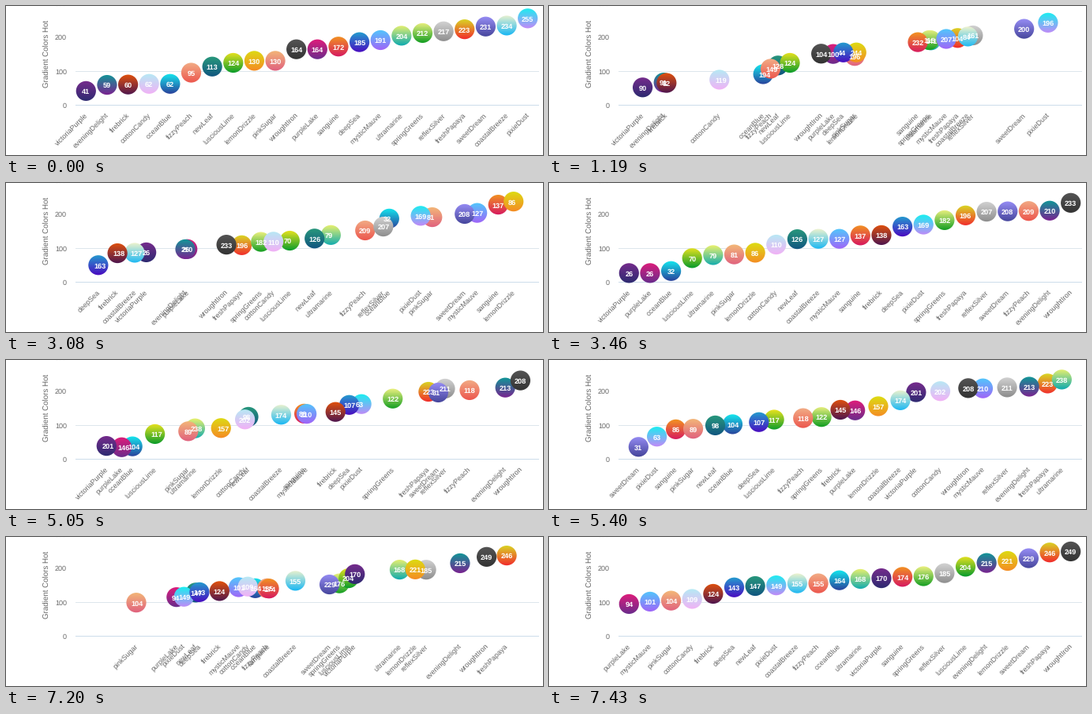
Animation of 680 by 190 pixels, one loop 8000 ms. Source, as a matplotlib script:

```python
import math

import matplotlib.pyplot as plt
import numpy as np
from matplotlib.animation import FuncAnimation
from matplotlib.patches import Circle

WIDTH, HEIGHT, DPI = 680, 190, 100
LOOP, STEP = 8000, 20
LEFT, RIGHT, BASE, UNIT = 88, 674, 126.1, 0.4325
RADIUS, DIGIT = 12.6, 5
GREY = "#666666"

# name, gradient colours from top to bottom, value in each round; topmost first
SERIES = [
    ("wroughtIron", "#565656 #333333", "164 104 233 208 249"),
    ("firebrick", "#e8540a #4a1450", "60 82 138 145 124"),
    ("cottonCandy", "#b4ecf4 #f2b0f6", "62 119 110 202 109"),
    ("eveningDelight", "#0c9c98 #7c2090", "59 91 210 213 215"),
    ("coastalBreeze", "#f8f6cc #16b6f4", "234 84 127 174 155"),
    ("deepSea", "#22a4d0 #4a08c0", "185 44 163 107 143"),
    ("sweetDream", "#9a90f8 #44449a", "231 200 208 31 229"),
    ("pixieDust", "#10f4f0 #c488f8", "255 196 169 63 149"),
    ("mysticMauve", "#4ecbfc #a262f8", "191 207 127 210 101"),
    ("lemonDrizzle", "#dce012 #f58a24", "130 244 86 157 221"),
    ("pinkSugar", "#f4bc78 #e0607e", "130 196 81 89 104"),
    ("sanguine", "#f49a1e #d61860", "172 232 137 86 174"),
    ("reflexSilver", "#d6d6d6 #8c8c8c", "217 161 207 211 185"),
    ("victoriaPurple", "#7a2c8e #2c2a70", "41 90 26 201 170"),
    ("purpleLake", "#e41c7a #662c8c", "164 100 26 146 94"),
    ("fizzyPeach", "#f2b088 #ec544c", "95 149 209 118 155"),
    ("lusciousLime", "#f4e61e #049a2c", "124 124 70 117 204"),
    ("newLeaf", "#2a9c7c #105480", "113 128 126 98 147"),
    ("springGreens", "#f6f484 #0c9c1e", "212 115 182 122 176"),
    ("oceanBlue", "#14eef2 #2a3c98", "62 194 32 104 164"),
    ("ultramarine", "#f4f46a #0caab0", "204 141 79 238 168"),
    ("freshPapaya", "#d8e024 #f2282c", "223 104 196 223 246"),
]
# start, end, progress already made at the start
MOVES = [(1110, 1520, 0.14), (3090, 3460, 0.136),
         (5050, 5460, 0.17), (6990, 7430, 0.14)]

VALUES = np.array([[int(v) for v in row[2].split()] for row in SERIES])
RANKS = np.argsort(np.argsort(VALUES, axis=0, kind="stable"), axis=0)
XS = LEFT + (RANKS + 0.5) * (RIGHT - LEFT) / len(SERIES)
YS = BASE - VALUES * UNIT
# left edge of each number, which is what glides between rounds
HALF_WIDTHS = np.where(VALUES > 99, 3, 2) * DIGIT / 2
EDGES = XS - HALF_WIDTHS

plt.rcParams["font.family"] = "Liberation Sans"
plt.rcParams["text.hinting"] = "no_hinting"
fig = plt.figure(figsize=(WIDTH / DPI, HEIGHT / DPI), dpi=DPI, facecolor="white")
ax = fig.add_axes([0, 0, 1, 1])


def px(size):
    return size * 72 / DPI


def gradient(top, bottom, rows=64):
    start, end = (np.array([int(c[i:i + 2], 16) for i in (1, 3, 5)]) / 255
                  for c in (top, bottom))
    return (start + (end - start) * np.linspace(0, 1, rows)[:, None])[:, None, :]


for y, colour in ((83.1, "#dde6ec"), (126.1, "#ccdcea")):
    ax.plot([LEFT, RIGHT], [y, y], color=colour, lw=px(1), zorder=1)
for value in (0, 100, 200, 300):
    ax.text(77, BASE - value * UNIT + 3.6, str(value), fontsize=px(9),
            color=GREY, ha="right", va="baseline")
ax.text(53.5, 60.5, "Gradient Colors Hot", fontsize=px(9.8), color=GREY,
        rotation=90, rotation_mode="anchor", ha="center", va="baseline")

balls, numbers, names = [], [], []
for i, (name, colours, _) in enumerate(SERIES):
    balls.append(ax.imshow(gradient(*colours.split()), interpolation="nearest",
                           aspect="auto", zorder=30 - i))
    numbers.append(ax.text(0, 0, "", fontsize=px(9.2), color="white",
                           weight="bold", ha="center", va="baseline",
                           zorder=60 - i))
    names.append(ax.text(0, 140, name, fontsize=px(9), color=GREY,
                         rotation=45, rotation_mode="anchor", ha="right",
                         va="baseline"))
ax.set(xlim=(0, WIDTH), ylim=(HEIGHT, 0))
ax.axis("off")


def state(time):
    """Current round and eased progress from the round before it."""
    current, progress = 0, 1.0
    for i, (start, end, head) in enumerate(MOVES, 1):
        if time >= start:
            part = min(1, (time - start) / (end - start))
            current = i
            progress = 0.5 - 0.5 * math.cos(math.pi * (head + (1 - head) * part))
    return current, progress


def draw(frame):
    current, progress = state((frame + 0.5) * STEP)
    before = max(current - 1, 0)
    xs, ys, edges = (p[:, before] + (p[:, current] - p[:, before]) * progress
                     for p in (XS, YS, EDGES))
    side = RADIUS + 1
    for i, (x, y) in enumerate(zip(xs, ys)):
        balls[i].set_extent((x - side, x + side, y + side, y - side))
        balls[i].set_clip_path(Circle((x, y), RADIUS, transform=ax.transData))
        numbers[i].set_position((edges[i] + HALF_WIDTHS[i, current], y + 3.8))
        numbers[i].set_text(str(VALUES[i, current]))
        names[i].set_x(x + 2.4)
    ax.set(xlim=(0, WIDTH), ylim=(HEIGHT, 0))
    return balls + numbers + names


anim = FuncAnimation(fig, draw, frames=LOOP // STEP, interval=STEP,
                     repeat=True, repeat_delay=0, blit=False)
plt.show()
```
